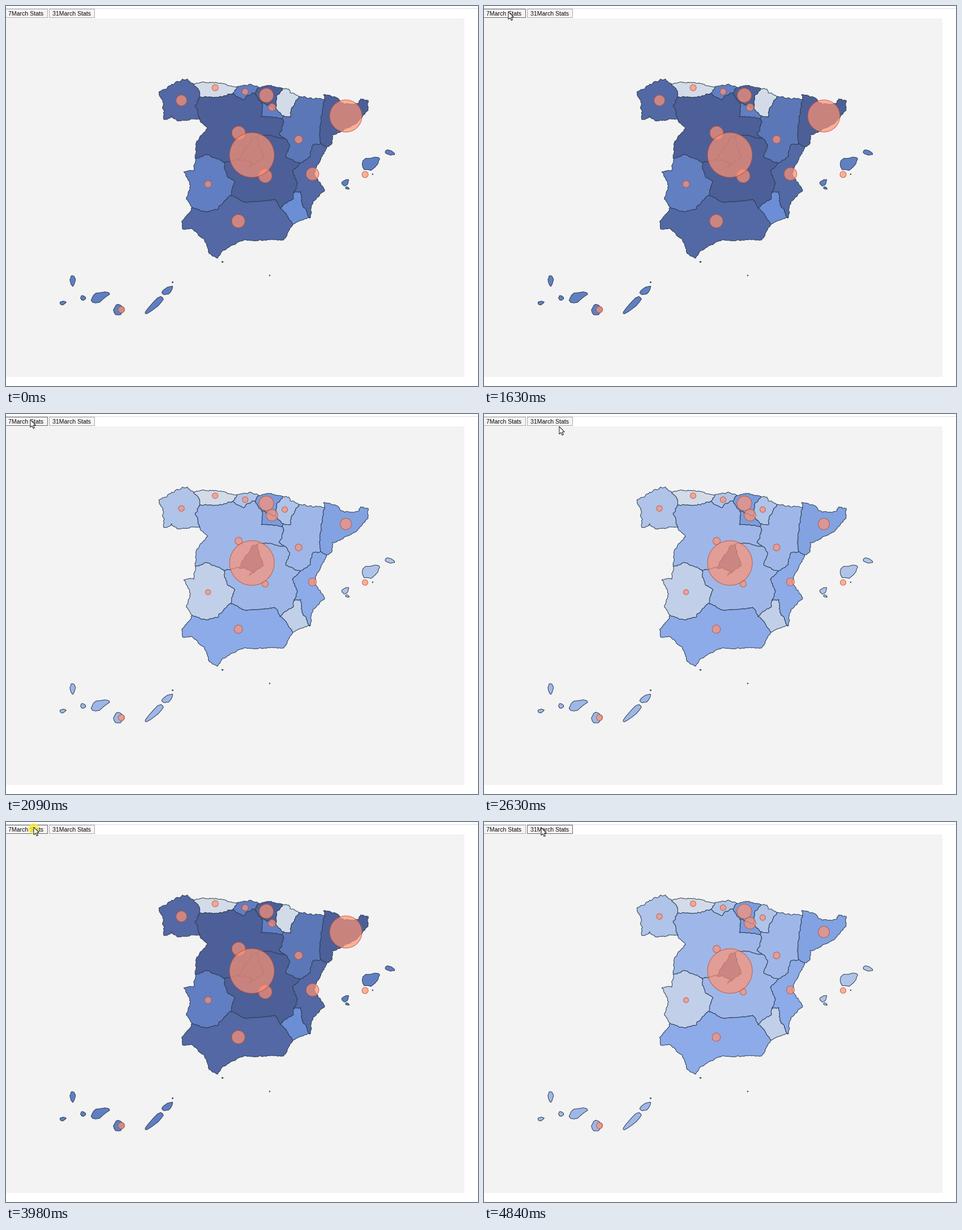
A matplotlib script for the animation above (4910 ms loop, 834x672 px).

```python
import math
import random

import matplotlib.pyplot as plt
import numpy as np
from matplotlib.animation import FuncAnimation
from matplotlib.patches import Circle, Polygon, Rectangle

W, H, DPI = 834, 672, 72
LOOP, FRAMES = 4910, 164
STEP = LOOP / FRAMES
random.seed(4)

fig = plt.figure(figsize=((W + 1e-4) / DPI, (H + 1e-4) / DPI), dpi=DPI,
                 facecolor="white")
ax = fig.add_axes([0, 0, 1, 1])
ax.set(xlim=(0, W), ylim=(H, 0))
ax.axis("off")

ax.add_patch(Rectangle((0, 22), 810, 634, fc="#f3f3f3", ec="none"))
ax.plot([0, W], [4.5, 4.5], color="#dddddd", lw=1)


# ---- ragged outlines -------------------------------------------------------

def roughen(pts, jag):
    """Midpoint displacement: a few key points become a ragged line."""
    pts = [np.array(p, float) for p in pts]
    for _ in range(5):
        out = pts[:1]
        for a, b in zip(pts, pts[1:]):
            size = math.dist(a, b)
            if size > 3:
                normal = np.array([a[1] - b[1], b[0] - a[0]]) / size
                shift = random.uniform(-1, 1) * min(jag, 0.25 * size)
                out.append((a + b) / 2 + normal * shift)
            out.append(b)
        pts = out
    return pts


borders = {}


def border(name, *pts, jag=1.2):
    borders[name] = roughen(pts, jag)


def outline(route):
    """Join borders into one ring; a leading minus walks a border backwards."""
    ring = []
    for name in route.split():
        part = borders[name.lstrip("-")]
        ring += (part[::-1] if name[0] == "-" else part)[:-1]
    return ring


def blob(x, y, length, width, tilt=0, taper=0.35):
    """An island: a wobbly ellipse that narrows towards one end."""
    c, s = math.cos(math.radians(tilt)), math.sin(math.radians(tilt))
    ring = []
    for a in np.linspace(0, math.tau, 14, endpoint=False):
        k = random.uniform(0.85, 1.15)
        u = length * k * math.cos(a)
        v = width * k * math.sin(a) * (1 - taper * math.cos(a))
        ring.append((x + u * c - v * s, y + u * s + v * c))
    return ring


border("ga_coast", (332, 138), (320, 129), (312, 129), (297, 138), (270, 152),
       (277, 178), (279, 201), (293, 194), (302, 203), (327, 200), (343, 202),
       jag=2.2)
border("ga_as", (332, 138), (342, 153), (341, 163))
border("ga_cl", (341, 163), (334, 176), (343, 202))
border("as_coast", (332, 138), (370, 135), (408, 143))
border("as_ca", (401, 155), (408, 143))
border("as_cl", (341, 163), (378, 160), (401, 155))
border("ca_coast", (408, 143), (434, 139), (447, 144))
border("ca_pv", (447, 144), (440, 154))
border("ca_cl", (401, 155), (420, 166), (428, 158), (440, 154))
border("pv_coast", (447, 144), (462, 140), (489, 146))
border("pv_na", (489, 146), (478, 160), (477, 181))
border("pv_ri", (452, 172), (477, 181))
border("pv_cl", (440, 154), (452, 172))
border("ri_na", (477, 181), (490, 194))
border("ri_ar", (490, 194), (488, 199))
border("ri_cl", (488, 199), (470, 196), (451, 196), (452, 172))
border("na_fr", (489, 146), (500, 147), (502, 153), (518, 160))
border("na_ar", (518, 160), (504, 182), (503, 196), (490, 194))
border("ar_fr", (518, 160), (563, 165))
border("ar_ct", (563, 165), (557, 202), (556, 243))
border("ar_va", (556, 243), (542, 246), (538, 266), (520, 278))
border("ar_cm", (520, 278), (495, 268), (501, 248), (494, 235))
border("ar_cl", (494, 235), (483, 228), (491, 206), (488, 199))
border("ct_fr", (563, 165), (561, 157), (580, 160), (598, 174), (624, 171),
       (627, 164), (640, 167))
border("ct_sea", (640, 167), (640, 184), (624, 202), (608, 214), (577, 227),
       (576, 243), (567, 249))
border("ct_va", (567, 249), (556, 243))
border("cl_pt", (343, 202), (356, 217), (337, 239), (335, 270))
border("cl_cm_w", (385, 277), (412, 272))
border("cl_ma", (412, 272), (420, 258), (437, 232), (443, 231))
border("cl_cm_e", (443, 231), (460, 228), (494, 235))
border("ma_cm", (443, 231), (455, 268), (430, 285), (436, 277), (412, 272))
border("cm_va", (520, 278), (506, 292), (515, 314), (509, 330))
border("cm_mu", (509, 330), (508, 341), (484, 358))
border("cm_an", (484, 358), (475, 342), (425, 348), (397, 335))
border("ex_cl", (335, 270), (355, 263), (385, 277))
border("ex_cm", (385, 277), (392, 303), (404, 310), (397, 335))
border("ex_an", (397, 335), (374, 360), (355, 364), (329, 356))
border("ex_pt", (335, 270), (332, 292), (314, 293), (326, 318), (319, 342),
       (329, 356))
border("an_west", (329, 356), (311, 380), (313, 395), (330, 395), (350, 412),
       (359, 438), (374, 446))
border("an_south", (374, 446), (384, 432), (420, 414), (490, 414), (507, 386))
border("an_mu", (484, 358), (495, 367), (507, 386))
border("mu_sea", (507, 386), (520, 379), (537, 375))
border("mu_va", (537, 375), (523, 350), (521, 328), (509, 330))
border("va_sea", (537, 375), (542, 346), (563, 325), (544, 296), (567, 249))


# ---- regions and bubbles ---------------------------------------------------

RAMP = np.array([(211, 219, 233), (141, 171, 232), (107, 142, 214),
                 (77, 95, 152)]) / 255


def shade(level):
    return np.array([np.interp(level, range(4), RAMP[:, c]) for c in range(3)])


regions, bubbles = [], []


def region(ring, late, early):
    """Late and early are levels on the colour ramp."""
    patch = Polygon(ring, fc=shade(late), ec="#2b3f52", lw=1, joinstyle="round")
    regions.append((ax.add_patch(patch), shade(late), shade(early)))


def bubble(x, y, late, early):
    disc = Circle((x, y), late, fc=(1, 0.576, 0.46, 0.7),
                  ec=(0.73, 0.3, 0.2, 0.8), lw=1, zorder=2)
    bubbles.append((ax.add_patch(disc), late, early))


# Galicia, Asturias, Cantabria
region(outline("ga_coast -ga_cl -ga_as"), 2.8, 0.5)
bubble(310, 167, 9.5, 5)
region(outline("as_coast -as_ca -as_cl -ga_as"), 0, 0)
bubble(369.5, 144.5, 5.5, 5)
region(outline("ca_coast ca_pv -ca_cl as_ca"), 2.33, 0.5)
bubble(422.5, 151.5, 5.5, 5)
# Basque Country, La Rioja, Navarre
region(outline("pv_coast pv_na -pv_ri -pv_cl -ca_pv"), 3, 1.5)
bubble(460, 158, 12.5, 13)
region(outline("pv_ri ri_na ri_ar ri_cl"), 2.33, 1.5)
bubble(470, 179, 6.5, 10.3)
region(outline("na_fr na_ar -ri_na -pv_na"), 0, 0.5)
bubble(492.5, 169, 0, 5)
# Aragon, Catalonia
region(outline("ar_fr ar_ct ar_va ar_cm ar_cl -ri_ar -na_ar"), 2.5, 0.75)
bubble(517, 236, 7, 6)
region(outline("ct_fr ct_sea ct_va -ar_ct"), 3, 1.32)
bubble(600.5, 194.5, 28.5, 10)
# Castile and Leon, Madrid, Castile-La Mancha
region(outline("ga_cl cl_pt ex_cl cl_cm_w cl_ma cl_cm_e ar_cl ri_cl "
               "-pv_cl -ca_cl -as_cl"), 3, 0.75)
bubble(411, 224.5, 12, 6.5)
region(outline("cl_cm_w -ma_cm cl_cm_e -ar_cm cm_va cm_mu cm_an -ex_cm"),
       3, 0.75)
bubble(458, 300.5, 12, 5.5)
region(outline("cl_ma ma_cm"), 3, 2.8)
bubble(434.5, 263.5, 39.5, 39.5)
# Extremadura, Andalusia, Murcia, Valencia
region(outline("ex_cl ex_cm ex_an -ex_pt"), 2.33, 0.25)
bubble(357, 315, 6, 4.5)
region(outline("an_west an_south -an_mu cm_an ex_an"), 2.8, 1)
bubble(410.5, 380.5, 11.7, 7.3)
region(outline("an_mu mu_sea mu_va cm_mu"), 2, 0.25)
region(outline("va_sea ct_va ar_va cm_va -mu_va"), 2.8, 1)
bubble(541.5, 297, 11.3, 7)
# Ceuta, Melilla
region(blob(382.5, 452.5, 1.3, 0.8), 2.8, 1)
region(blob(466, 476.5, 0.7, 0.7), 2.8, 1)
# Balearic Islands
for place in [(678.5, 259.5, 8.5, 4, 15), (644, 278, 17, 10, -25),
              (600, 312, 6.5, 4.5, -45), (603, 322, 3.5, 1.8, 25),
              (648, 297.5, 0.7, 0.7)]:
    region(blob(*place), 2.33, 0.5)
bubble(634.5, 298, 5.5, 5)
# Canary Islands
for place in [(118, 486, 9, 4.5, 90), (101, 525, 6, 3, -15),
              (136.5, 516.5, 4.5, 4), (166, 514, 17, 7.5, -22),
              (200, 537.5, 9.5, 9), (262, 529, 20, 5.5, 137),
              (286, 503, 11, 5, -35), (294.5, 488.5, 1, 0.8)]:
    region(blob(*place), 2.33, 0.75)
bubble(204, 537, 5.7, 5.5)


# ---- buttons and pointer ---------------------------------------------------

def button(x, width, text_x, label):
    box = Rectangle((x, 5.5), width, 15, fc="#f5f5f5", ec="#a9a9a9", lw=1)
    ax.text(text_x, 17, label, family="Liberation Sans", size=10.5,
            color="#0a0a0a", va="baseline", zorder=3)
    return ax.add_patch(box)


buttons = [button(-0.5, 73, 4, "7March Stats"),
           button(75.5, 80, 82, "31March Stats")]

glow = ax.add_patch(Circle((0, 0), 9.5, fc=(0.99, 0.93, 0.16, 0.75),
                           ec="none", zorder=4))
ARROW = np.array([(0, 0), (0, 13.5), (3.1, 10.8), (5.2, 15.5), (7.4, 14.5),
                  (5.3, 9.9), (9.2, 9.6)])
arrow = ax.add_patch(Polygon(ARROW, fc="white", ec="#141420", lw=1, zorder=5))

# time, x, y of the pointer tip
path = np.array([
    (590, 102, 166), (920, 44, 30), (1160, 43, 10), (2150, 43, 10),
    (2620, 133, 22), (2860, 117, 10), (3550, 117, 10), (3740, 49, 9),
    (4220, 49, 9), (4540, 101, 10),
])
# press and release times of the mouse button
clicks = [(1465, 1620), (3025, 3180), (3960, 4120), (4760, 4825)]
# start time of each change and the share of early data it leads to
changes = [(1572, 1), (3098, 0), (4050, 1)]
CHANGE = 550


def ease(u):
    u = min(max(u, 0), 1)
    return 4 * u ** 3 if u < 0.5 else 1 - 4 * (1 - u) ** 3


def early_share(t):
    share = 0
    for start, goal in changes:
        share += (goal - share) * ease((t - start) / CHANGE)
    return share


def update(i):
    t = (i + 0.5) * STEP
    share = early_share(t)
    for patch, late, early in regions:
        patch.set_facecolor(late + (early - late) * share)
    for disc, late, early in bubbles:
        r = late + (early - late) * share
        disc.set_radius(r)
        disc.set_visible(r > 0.3)

    x, y = (np.interp(t, path[:, 0], path[:, c]) for c in (1, 2))
    shown = t >= path[0, 0]
    arrow.set_xy(ARROW + (x, y))
    arrow.set_visible(shown)
    glow.center = (x, y + 3)
    glow.set_visible(any(a <= t < b for a, b in clicks))
    for box in buttons:
        over = shown and y < 21 and 0 <= x - box.get_x() <= box.get_width()
        box.set_edgecolor("#66666e" if over else "#a9a9a9")
    return [arrow, glow, *buttons]


anim = FuncAnimation(fig, update, frames=FRAMES, interval=STEP, repeat=True,
                     repeat_delay=0, blit=False)
plt.show()
```
